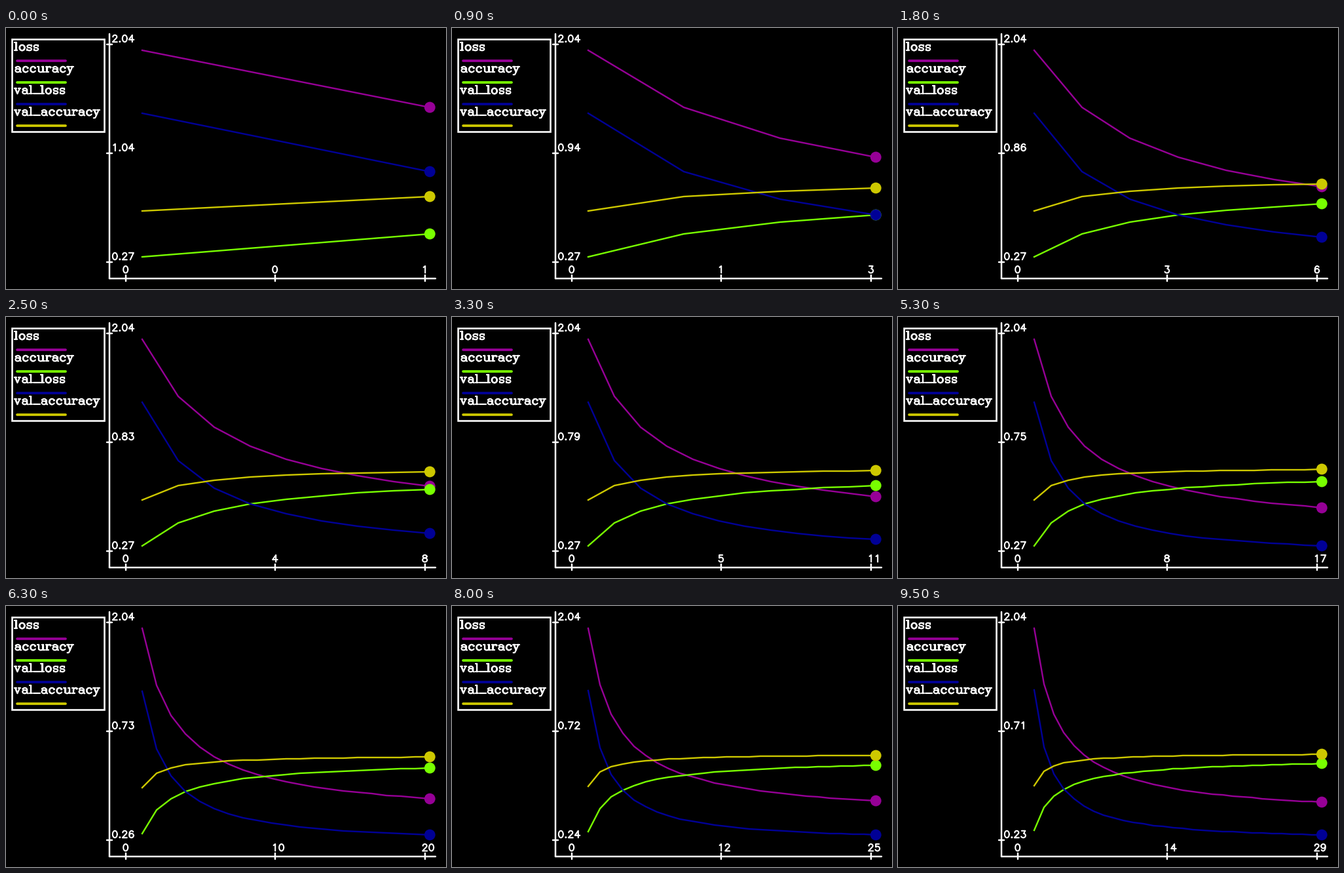
A matplotlib script for the animation above (9.7 s loop, 672 by 398 pixels).

```python
import numpy as np
import matplotlib.pyplot as plt
from matplotlib.animation import FuncAnimation
from matplotlib.collections import LineCollection
from matplotlib.patches import Circle, Rectangle

W, H, DPI = 672, 398, 100
FRAMES, STEP = 97, 100
PX = 72 / DPI  # points per pixel

LEFT, RIGHT = 208, 647
TOP, BOTTOM = 34, 349
XTICKS = (183, 411, 640)
YTICKS = (25, 191, 357)


def learn(start, end, shift, power):
    """Training curve that eases from start towards end by a power law."""
    return lambda n: end + (start - end) * ((1 + shift) / (n + shift)) ** power


SERIES = [
    ("loss", "#960096", learn(2.047, .367, 1.1, .887)),
    ("accuracy", "#78ff00", learn(.275, .925, .7, .79)),
    ("val_loss", "#000096", learn(1.505, .18, 1, 1.165)),
    ("val_accuracy", "#cdc800", learn(.668, .958, 0, .82)),
]


# Stroke lettering: baseline at y = 0, y up, cap height 21 units.
def arc(cx, cy, rx, ry, a=0, b=360):
    t = np.radians(np.linspace(a, b, 25))
    return list(zip(cx + rx * np.cos(t), cy + ry * np.sin(t)))


def bar(x0, x1, y):
    return [(x0, y), (x1, y)]


def stem(x, y0, y1):
    return [[(x + d, y0), (x + d, y1)] for d in (0, 1)]


def digit_strokes():
    six = [arc(10.5, 6.5, 6.5, 6.5), arc(11, 10.5, 7, 10.5, 45, 200)]
    nine = [[(20 - x, 21 - y) for x, y in s] for s in six]
    shapes = [
        [arc(10, 10.5, 7, 10.5)],
        [[(6, 17), (11, 21), (11, 0)]],
        [arc(10, 15.5, 6, 5.5, 180, -30) + bar(3, 17, 0)],
        [bar(5, 16, 21) + arc(10, 6.5, 7, 6.5, 80, -155)],
        [[(13, 0), (13, 21)] + bar(3, 18, 7)],
        [bar(15, 5, 21) + arc(10, 7, 7, 7, 135, -155)],
        six,
        [bar(3, 17, 21) + [(7, 0)]],
        [arc(10, 16.5, 6, 4.5), arc(10, 6, 7, 6)],
        nine,
    ]
    glyphs = {str(d): (20, s) for d, s in enumerate(shapes)}
    glyphs["."] = 10, [arc(5, 1, .8, .8)]
    return glyphs


def letter_strokes():
    vee = [[(3, 14), (9, 0), (15, 14)], [(4, 14), (9, 2)],
           bar(1, 7, 14), bar(11, 17, 14)]
    return {
        "l": (11, stem(5, 0, 21) + [bar(2, 6, 21), bar(2, 9, 0)]),
        "o": (20, [arc(10, 7, r, 7) for r in (6, 7)]),
        "c": (19, [arc(10, 7, 7, 7, 35, 325) , arc(10, 7, 6, 7, 90, 270),
                   arc(15, 10.5, .8, .8)]),
        "s": (17, [arc(8.5, 10.5, 5.5, 3.5, 20, 270)
                   + arc(8.5, 3.5, 5.5, 3.5, 90, -160),
                   [(14, 14), (14, 10)], [(3, 4), (3, 0)]]),
        "a": (20, [arc(10, 9.5, 5.5, 4.5, 150, 0) + arc(18.5, 3, 3, 3, 180, 270),
                   arc(9.7, 4.2, 5.7, 4.2), arc(5, 11.5, .6, .6)]
              + stem(15, 2, 10)),
        "u": (22, stem(5, 3, 14) + stem(16, 0, 14)
              + [arc(10.5, 4, 5.2, 4, 190, 350),
                 bar(2, 6, 14), bar(13, 17, 14), bar(16, 20, 0)]),
        "r": (15, stem(4, 0, 14) + [arc(10.5, 8, 5.5, 6, 180, 50),
                                    arc(13, 12, .8, .8),
                                    bar(1, 5, 14), bar(1, 8, 0)]),
        "v": (18, vee),
        "y": (18, vee + [[(9, 0), (6, -6)] + bar(4, 2, -6.5)]),
        "_": (18, [bar(1, 17, 0)]),
    }


GLYPHS = {**digit_strokes(), **letter_strokes()}


def lettering(text, x, y, size):
    segs = []
    for ch in text:
        width, shape = GLYPHS[ch]
        segs += [np.array(s) * (size, -size) + (x, y) for s in shape]
        x += width * size
    return segs


def strokes(segs, lw, color="white", **kw):
    return ax.add_collection(LineCollection(
        segs, colors=color, linewidths=lw * PX, capstyle="round",
        joinstyle="round", **kw))


def two_digits(v):
    return f"{int(v * 100) / 100:.2f}"


fig = plt.figure(figsize=(W / DPI, H / DPI), dpi=DPI, facecolor="black")
ax = fig.add_axes([0, 0, 1, 1])
ax.set_xlim(0, W)
ax.set_ylim(H, 0)
ax.axis("off")

# Axes and ticks
rules = [[(158, 9), (158, 381.5)], bar(158, 656, 381.5)]
rules += [bar(154, 162, y) for y in YTICKS]
rules += [[(x, 377), (x, 385.5)] for x in XTICKS]
strokes(rules, 2.5)

# Legend
ax.add_patch(Rectangle((8.8, 16.7), 141, 141, fill=False, ec="white", lw=2.6 * PX))
curves = []
for i, (name, color, _) in enumerate(SERIES):
    strokes(lettering(name, 12, 34.3 + 33 * i, .6), 2.2, zorder=4)
    strokes([bar(17, 91, 49.7 + 33 * i)], 3.8, color)
    line, = ax.plot([], [], color=color, lw=2.4 * PX, zorder=5 + i,
                    solid_joinstyle="round")
    dot = ax.add_patch(Circle((0, 0), 8.4, fc=color, lw=0, zorder=5 + i))
    curves.append((line, dot))
labels = strokes([], 2.1, zorder=4)


def update(k):
    n = 2 + (3 * k + 1) // 10  # three epochs per second
    epochs = np.arange(1, n + 1)
    seen = np.array([curve(epochs) for *_, curve in SERIES])
    hi, lo = seen.max(), seen.min()
    xs = np.round(np.linspace(LEFT, RIGHT, n))
    ys = np.round(TOP + (BOTTOM - TOP) * (hi - seen) / (hi - lo))
    for (line, dot), y in zip(curves, ys):
        line.set_data(xs, y)
        dot.center = xs[-1] + .3, y[-1]

    segs = []
    for y, v in zip(YTICKS, (hi, seen.mean(), lo)):
        segs += lettering(two_digits(v), 161.3, y - 3.7, .5)
    for x, v in zip(XTICKS, (0, (n - 1) // 2, n - 1)):
        segs += lettering(str(v), x - 5.3, 373.5, .5)
    labels.set_segments(segs)
    return [labels]


anim = FuncAnimation(fig, update, frames=FRAMES, interval=STEP,
                     repeat=True, repeat_delay=0, blit=False)
plt.show()
```
